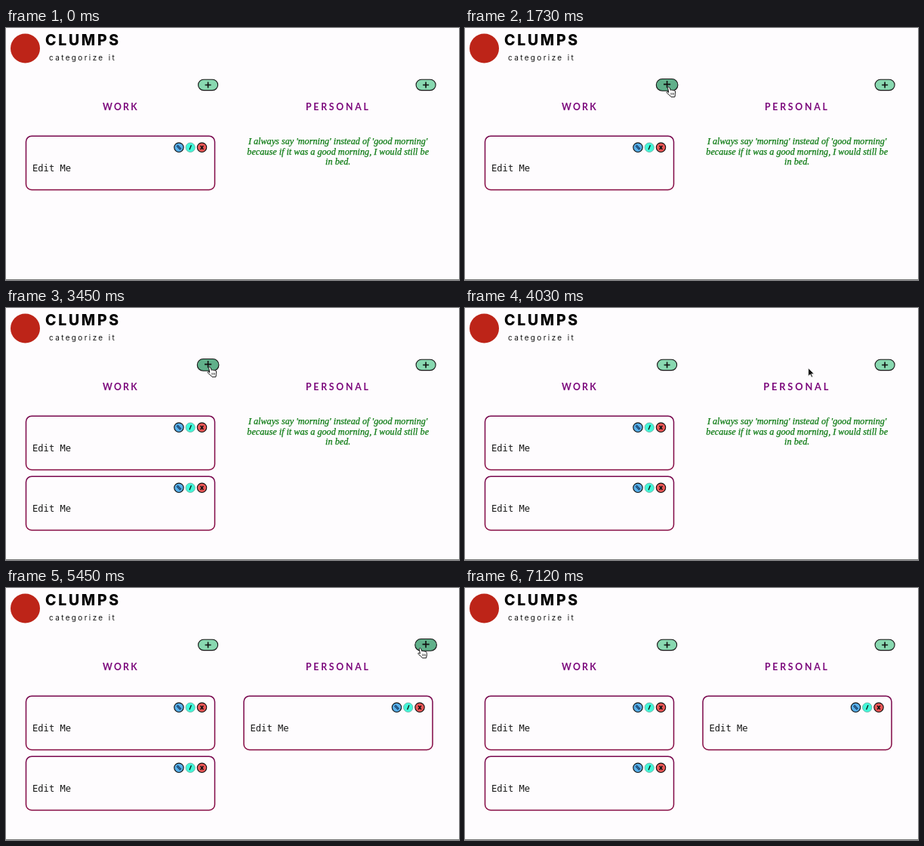
Write an HTML page that moves like this. It is 600 px wide and 334 px high and loops after 7150 ms.

```html
<!DOCTYPE html>
<html lang="en">
<head>
<meta charset="utf-8">
<title>Board</title>
<style>
html, body { margin: 0; width: 100%; height: 100%; overflow: hidden; background: #fefcfe; }
svg { display: block; width: 600px; height: 334px; }
.brand { font: 800 19.5px Inter, sans-serif; letter-spacing: 2.7px; }
.tag { font: 10px Inter, sans-serif; letter-spacing: 2.35px; fill: #111; }
.head { font: 700 12.3px Lato, sans-serif; fill: #7c087c; }
.quote { font: italic 12.2px "Liberation Serif", serif; fill: #0c7a12; stroke: #0c7a12; stroke-width: .25; text-anchor: middle; }
.body { font: 12.15px "DejaVu Sans Mono", monospace; fill: #151515; }
</style>
</head>
<body>
<svg viewBox="0 0 600 334">
  <defs>
    <linearGradient id="edge" x1="0" y1="0" x2="0" y2="1">
      <stop offset="0" stop-color="#78084e"/>
      <stop offset="1" stop-color="#860a42"/>
    </linearGradient>
    <g id="card">
      <rect x="26.5" y="143.2" width="250" height="71.2" rx="7.5" fill="#fefcfe" stroke="url(#edge)" stroke-width="1.5"/>
      <g stroke="#111">
        <circle cx="229" cy="158.3" r="6.2" fill="#58b0ea" stroke-width="1.1"/>
        <path d="M226.6 155.8l4.8 5" stroke="#123a63" stroke-width="2.8"/>
        <path d="M226.8 156l4.2 4.4" stroke="#4b86b8" stroke-width="1"/>
        <circle cx="244.2" cy="158.3" r="6.2" fill="#42f8d8" stroke="#6fa8a0" stroke-width=".8"/>
        <path d="M245.4 155.2l-2.3 6" stroke-width="1.3"/>
        <circle cx="259.5" cy="158.3" r="6.2" fill="#ee5757" stroke-width="1.1"/>
        <path d="M257.6 156l3.8 5m0-5l-3.8 5" stroke-width="1.5"/>
      </g>
      <text class="body" x="35" y="190">Edit Me</text>
    </g>
  </defs>
  <rect width="600" height="334" fill="#fefcfe"/>
  <circle cx="25.5" cy="27" r="19.5" fill="#bd2418"/>
  <text class="brand" x="52" y="23">CLUMPS</text>
  <text class="tag" x="57" y="42.6">categorize it</text>
  <g id="workHead"><text class="head" x="128" y="108.5" letter-spacing="2.2">WORK</text></g>
  <g id="ownHead"><text class="head" x="397" y="108.5" letter-spacing="2.75">PERSONAL</text></g>
  <g id="workAdd"></g>
  <g id="ownAdd"></g>
  <g id="quote" class="quote">
    <text x="439.7" y="153.7">I always say 'morning' instead of 'good morning'</text>
    <text x="439.7" y="167.5">because if it was a good morning, I would still be</text>
    <text x="439.7" y="181.3">in bed.</text>
  </g>
  <use href="#card"/>
  <use id="workCard" href="#card" y="80"/>
  <use id="ownCard" href="#card" x="288.5"/>
  <path d="M0 333.5H600" stroke="#777"/>
  <g id="cursor">
    <path id="arrow" d="M0 0v11l2.6-2.4 1.7 3.8 1.7-.7-1.7-3.8h3.5z" fill="#111" stroke="#fff" stroke-width=".8"/>
    <g id="hand" stroke="#111">
      <path d="M-1.6 1.2c-.6-1.6 1.5-2.2 2.1-.8l1.6 3.6c.4-.9 1.7-.8 2 .1.6-.7 1.8-.4 2 .4.8-.5 1.9 0 2 .9.3 1.6.5 3 0 4.6l-.5 2.8H2.6C1.4 11-.6 9.6-2.2 8.2c-1-.9-1-.8-1-1.5.4-1 1.7-.6 2.6.3z" fill="#fff"/>
      <path d="M2.6 7.4v2.8m1.9-2.8v2.8m1.8-2.8v2.8" stroke-width=".7"/>
    </g>
  </g>
</svg>
<script>
const LOOP = 7150, ENTER = 270, LEAVE = 6850;
const WORK_ADDED = 2560, OWN_ADDED = 4960;
// time, x, y of the pointer tip
const path = [
  [270, 318, -14], [1050, 270.3, 78.5], [3580, 270.3, 78.5], [4320, 549, 80],
  [5850, 549, 80], [6360, 410, 69], [6520, 410, 69], [6850, 372, 30]
];
const $ = id => document.getElementById(id);
const show = (id, on) => $(id).setAttribute('display', on ? 'inline' : 'none');
const clamp = v => Math.max(0, Math.min(1, v));
const mix = (a, b, k) => a + (b - a) * k;

function pointer(t) {
  if (t <= path[0][0]) return path[0].slice(1);
  for (let i = 1; i < path.length; i++) {
    const [t0, x0, y0] = path[i - 1], [t1, x1, y1] = path[i];
    if (t < t1) {
      const p = (t - t0) / (t1 - t0), k = p * p * (3 - 2 * p);
      return [mix(x0, x1, k), mix(y0, y1, k)];
    }
  }
  return path[path.length - 1].slice(1);
}

// 0 outside the box, rising to 1 a few pixels inside it
function hover([x, y], left, top, right, bottom, soft) {
  return clamp(Math.min(x - left, right - x, y - top, bottom - y) / soft);
}

function drawAdd(id, cx, k) {
  const w = mix(26, 28.6, k), h = mix(14.4, 15.8, k);
  const fill = [[136, 96], [216, 176], [176, 138]].map(c => Math.round(mix(c[0], c[1], k)));
  const s = mix(4, 4.6, k), y = mix(75.5, 74.6, k);
  $(id).innerHTML =
    `<rect x="${cx - w / 2}" y="${75.4 - h / 2}" width="${w}" height="${h}" rx="${h / 2}" fill="rgb(${fill})" stroke="#161616" stroke-width="1.1"/>` +
    `<path d="M${cx - s} ${y}h${2 * s}M${cx} ${y - s}v${2 * s}" stroke="#111" stroke-width="1.6"/>`;
}

function grow(id, cx, k) {
  $(id).setAttribute('transform', `translate(${cx} 105) scale(${1 + .04 * k}) translate(${-cx} -105)`);
}

function draw(t) {
  const on = t >= ENTER && t < LEAVE, tip = on ? pointer(t) : [-99, -99];
  const overWork = hover(tip, 253, 67, 282, 84, 3);
  const overOwn = hover(tip, 541, 67, 571, 84, 3);
  drawAdd('workAdd', 267.6, overWork);
  drawAdd('ownAdd', 556.1, overOwn);
  grow('workHead', 151.5, hover(tip, 27, 62, 245, 125, 5));
  grow('ownHead', 439.5, hover(tip, 318, 62, 535, 125, 5));
  show('workCard', t >= WORK_ADDED);
  show('ownCard', t >= OWN_ADDED);
  show('quote', t < OWN_ADDED);
  show('cursor', on);
  $('cursor').setAttribute('transform', `translate(${tip})`);
  const link = overWork + overOwn > 0;
  show('hand', link);
  show('arrow', !link);
}

const start = performance.now();
function tick() {
  draw((performance.now() - start) % LOOP);
  requestAnimationFrame(tick);
}
tick();
</script>
</body>
</html>
```
